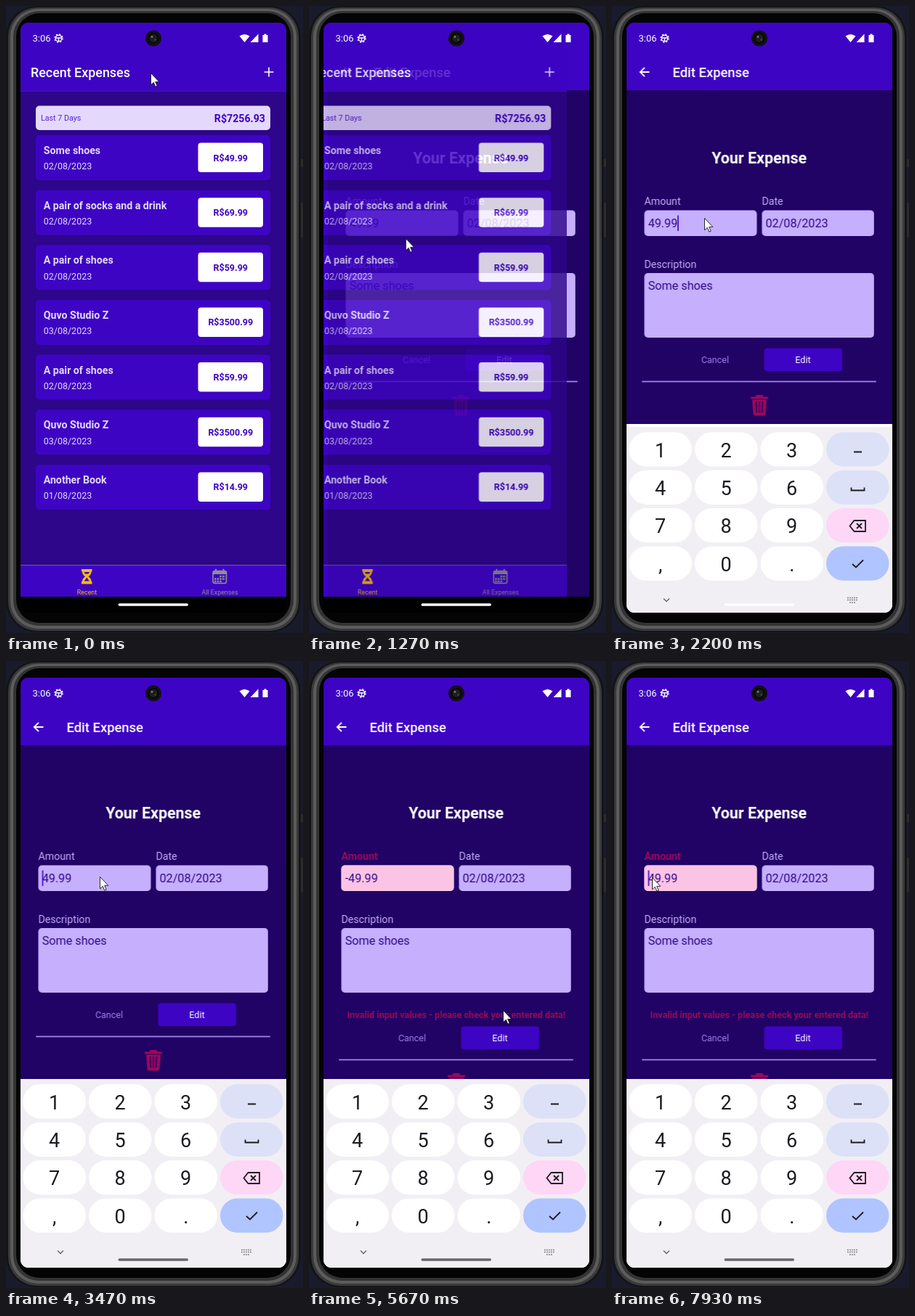
An HTML page that plays this animation: 409x864 px, repeating every 8000 ms.

```html
<!DOCTYPE html>
<html lang="en">
<head>
<meta charset="utf-8">
<title>Expense tracker demo</title>
<style>
html, body { margin: 0; width: 100%; height: 100%; overflow: hidden; background: #191b2d; }
svg { display: block; width: 100vw; height: 100vh; }
text { font: 12.5px Roboto, sans-serif; }
.bold { font-weight: 700; }
.mid { text-anchor: middle; }
.end { text-anchor: end; }
.head { font-size: 17.9px; font-weight: 500; fill: #fff; }
.label { font-size: 14.2px; fill: #c6affc; }
.value { font-size: 16.2px; fill: #2d0689; }
.item { font-size: 14.2px; font-weight: 700; fill: #e4d9fd; }
.tab { font-size: 8.9px; text-anchor: middle; }
.digit { font-size: 27px; text-anchor: middle; fill: #1d1b20; }
.line { fill: none; stroke: #1d1b20; stroke-width: 1.8; }

.list, .form, .cursor, .keyboard, .handle { animation: 8s linear infinite; }
.step, .lower, .caret { animation: 8s step-end infinite; }

.list { animation-name: leave; }
@keyframes leave {
  0%, 13% { transform: none; opacity: 1; animation-timing-function: ease-out; }
  14.96% { transform: translateX(-28px); opacity: 1; }
  15.875% { transform: translateX(-30.7px); opacity: .82; }
  17.5% { transform: translateX(-36px); opacity: .42; }
  19.125% { transform: translateX(-36.7px); opacity: .18; }
  20.5%, 100% { transform: translateX(-36.7px); opacity: 0; }
}
.form { animation-name: enter; }
@keyframes enter {
  0%, 13% { transform: translateX(36.7px); animation-timing-function: ease-out; }
  14.96% { transform: translateX(8.7px); }
  15.875% { transform: translateX(6px); }
  17.5% { transform: translateX(.7px); }
  19.125%, 100% { transform: none; }
}
.cursor { animation-name: point; }
@keyframes point {
  0%, .8% { transform: translate(199px, 92px); }
  5.5% { transform: translate(118px, 250px); }
  9.1%, 12% { transform: translate(125px, 222px); }
  15.875% { transform: translate(133px, 320px); }
  19.125%, 21.6% { transform: translate(96px, 335px); }
  24.5%, 32% { transform: translate(127px, 292px); }
  35%, 61.6% { transform: translate(129px, 297px); }
  67%, 74.1% { transform: translate(267px, 481px); }
  83.3%, 86.6% { transform: translate(52px, 298px); }
  88.4%, 95% { transform: translate(41px, 312px); }
  96.6%, 100% { transform: translate(55px, 298px); }
}
.white { animation-name: resize; }
@keyframes resize { 0% { opacity: 0; } 24.125%, 100% { opacity: 1; } }
.keyboard { animation-name: rise; }
@keyframes rise {
  0%, 24.125% { transform: translateY(262px); animation-timing-function: cubic-bezier(.1, .7, .3, 1); }
  27.5% { transform: translateY(4px); animation-timing-function: ease-out; }
  29.5%, 100% { transform: none; }
}
.handle { fill: #fff; animation-name: darken; }
@keyframes darken { 0%, 31.6% { fill: #fff; } 40%, 100% { fill: #68656c; } }
.plain { animation-name: plain; }
@keyframes plain { 0% { opacity: 1; } 54.125% { opacity: 0; } 99.125%, 100% { opacity: 1; } }
.minus { animation-name: minus; }
@keyframes minus { 0% { opacity: 0; } 54.125% { opacity: 1; } 99.125%, 100% { opacity: 0; } }
.valid { animation-name: valid; }
@keyframes valid { 0% { opacity: 1; } 68.75%, 100% { opacity: 0; } }
.error { animation-name: error; }
@keyframes error { 0% { opacity: 0; } 68.75%, 100% { opacity: 1; } }
.lower { animation-name: push; }
@keyframes push { 0% { transform: none; } 68.75%, 100% { transform: translateY(32px); } }
.caret { animation-name: blink; }
@keyframes blink {
  0% { opacity: 0; transform: translateX(91px); }
  24.125% { opacity: 1; transform: translateX(91px); }
  31.6% { opacity: 0; transform: translateX(91px); }
  33.7% { opacity: 1; transform: translateX(50.5px); }
  37.5% { opacity: 0; transform: translateX(50.5px); }
  43.3% { opacity: 1; transform: translateX(50.5px); }
  50% { opacity: 0; transform: translateX(50.5px); }
  54.125% { opacity: 1; transform: translateX(55px); }
  61.6% { opacity: 0; transform: translateX(55px); }
  82.5% { opacity: 1; transform: translateX(55px); }
  86.6% { opacity: 0; transform: translateX(55px); }
  92.5% { opacity: 1; transform: translateX(55px); }
  99.125%, 100% { opacity: 1; transform: translateX(50.5px); }
}
</style>
</head>
<body>
<svg viewBox="0 0 409 864" preserveAspectRatio="none">
  <defs>
    <clipPath id="screen"><rect x="20" y="23" width="366" height="813" rx="11"/></clipPath>
    <clipPath id="app"><rect x="20" y="23" width="366" height="791"/></clipPath>
    <clipPath id="dock"><rect x="20" y="576" width="366" height="260"/></clipPath>
  </defs>

  <!-- phone body -->
  <g fill="#2b2c30">
    <rect x="403" y="211" width="6" height="11"/>
    <rect x="403" y="271" width="6" height="48" rx="2"/>
  </g>
  <rect x="0" y="0" width="406" height="863" rx="42" fill="#141416"/>
  <rect x="3" y="2" width="400" height="859" rx="40" fill="#3a3a3b"/>
  <rect x="6" y="4" width="394" height="854" rx="38" fill="#5c5c5c"/>
  <rect x="10" y="7" width="386" height="847" rx="35" fill="#333"/>
  <rect x="14" y="10" width="378" height="840" rx="32" fill="#040404"/>

  <g clip-path="url(#screen)">
    <rect x="20" y="23" width="366" height="813" fill="#000"/>
    <g clip-path="url(#app)">
      <rect x="20" y="23" width="366" height="791" fill="#3e04c3"/>

      <g class="form">
        <rect x="20" y="23" width="366" height="791" fill="#200364"/>
        <rect x="20" y="23" width="366" height="93" fill="#3e04c3"/>
        <path d="M51.5 91H39M45 84.8L38.8 91L45 97.2" fill="none" stroke="#fff" stroke-width="1.8"/>
        <text class="head" x="83.5" y="98" style="font-size:18.4px">Edit Expense</text>
        <text class="bold mid" x="202.7" y="217" fill="#fff" style="font-size:21.4px">Your Expense</text>
        <text class="label step valid" x="44.5" y="274">Amount</text>
        <text class="label bold step error" x="44.5" y="274" style="fill:#9b095c">Amount</text>
        <text class="label" x="206.5" y="274">Date</text>
        <text class="label" x="44.5" y="360.5">Description</text>
        <g fill="#c6affc">
          <rect x="44.5" y="281.5" width="155" height="35.5" rx="5"/>
          <rect x="206.5" y="281.5" width="154.5" height="35.5" rx="5"/>
          <rect x="44.5" y="368" width="316.5" height="89" rx="5"/>
        </g>
        <rect class="step error" x="44.5" y="281.5" width="155" height="35.5" rx="5" fill="#fcc4e4"/>
        <text class="value step plain" x="49.7" y="305">49.99</text>
        <text class="value step minus" x="49.7" y="305">-49.99</text>
        <text class="value" x="211.5" y="305">02/08/2023</text>
        <text class="value" x="49.7" y="390.5">Some shoes</text>
        <rect class="caret" x="-.8" y="288.5" width="1.6" height="21.5" fill="#3e04c3"/>
        <text class="bold mid step error" x="203" y="492" fill="#9b095c" style="font-size:12.6px">Invalid input values - please check your entered data!</text>
        <g class="lower">
          <text class="mid" x="142" y="492" fill="#a281f0">Cancel</text>
          <rect x="209.5" y="471.5" width="107.5" height="31.5" rx="3.5" fill="#3e04c3"/>
          <text class="mid" x="263" y="492" fill="#fff">Edit</text>
          <rect x="41" y="516.6" width="323" height="1.8" fill="#a281f0"/>
          <path d="M191 538.5H198V536H208V538.5H215V541.5H191ZM193 542.5H213L211.5 562Q211.3 564.5 209 564.5H197Q194.700 564.5 194.500 562Z" fill="#9b095c"/>
          <path d="M198.7 545L199.2 560.5M203 545V560.5M207.3 545L206.8 560.5" stroke="#200364" stroke-width="1.6"/>
        </g>
      </g>

      <g class="list">
        <rect x="20" y="23" width="366" height="791" fill="#2d0689"/>
        <rect x="20" y="23" width="366" height="94" fill="#3e04c3"/>
        <rect x="20" y="117" width="366" height="1" fill="#40199a"/>
        <text class="head" x="34" y="98">Recent Expenses</text>
        <path d="M355.5 91H368.5M362 84.5V97.5" stroke="#fff" stroke-width="1.6"/>
        <rect x="41" y="137.5" width="323" height="33.5" rx="5" fill="#e4d9fd"/>
        <text x="48" y="158" fill="#5721d4" style="font-size:10.7px">Last 7 Days</text>
        <text class="bold end" x="357" y="159.5" fill="#3e04c3" style="font-size:14.2px">R$7256.93</text>
        <g id="cards"></g>
        <rect x="20" y="770" width="366" height="44" fill="#3e04c3"/>
        <rect x="20" y="770" width="366" height=".8" fill="#7c6f9f"/>
        <path d="M104 776H118.5V779.500H117.500Q117.500 783.500 113.500 786.300Q117.500 789 117.500 793H118.500V796.500H104V793H105Q105 789 109 786.300Q105 783.500 105 779.500H104Z" fill="#f7bc0c"/>
        <path d="M107.5 780H115L113.5 782.500H109ZM111.250 787.500L114.800 792.500H107.700Z" fill="#3e04c3"/>
        <g fill="none" stroke="#8e8e93">
          <rect x="285" y="778.500" width="18.500" height="17" rx="2.500" stroke-width="1.600"/>
          <path d="M285 781H303.5" stroke-width="4"/>
          <path d="M289 775.800V779M299.500 775.800V779" stroke-width="2"/>
          <path d="M294.300 786H302M287 789.500H302M287 793H298" stroke-width="2.300" stroke-dasharray="2.500 1.150"/>
        </g>
        <text class="tab" x="111.5" y="811" fill="#f7bc0c">Recent</text>
        <text class="tab" x="294.5" y="811" fill="#8e8e93">All Expenses</text>
      </g>
    </g>

    <!-- status bar -->
    <text x="36.5" y="49" fill="#fff" style="font-size:13px">3:06</text>
    <g fill="none" stroke="#fff">
      <circle cx="72.5" cy="44.5" r="4.3" stroke-width="1.4"/>
      <circle cx="72.5" cy="44.5" r="5.6" stroke-width="1.3" stroke-dasharray="2.2 2.2"/>
      <path d="M69 44H76M72.5 44V48" stroke-width="1.3"/>
    </g>
    <path d="M321.5 41.5Q328.5 36.5 335.5 41.5L328.5 50ZM347.5 38.5V50H336.5ZM353.5 40H355.5V38.5H358.5V40H360.5V50H353.5Z" fill="#fff"/>
    <circle cx="203" cy="44.5" r="11" fill="#111214"/>
    <circle cx="203" cy="44.5" r="6.5" fill="#1d1f1f" stroke="#08080a" stroke-width="2"/>
    <circle cx="201" cy="42.5" r="1.4" fill="#75796e"/>
    <circle cx="205.5" cy="46.5" r="1" fill="#565a52"/>

    <rect class="step white" x="20" y="576" width="366" height="260" fill="#fff"/>
    <g clip-path="url(#dock)">
      <g class="keyboard">
        <rect x="20" y="576" width="366" height="260" fill="#f2eff4"/>
        <g id="keys"></g>
        <path class="line" d="M333 610.5H344M329.5 659.5V663.5H347.5V659.5"/>
        <path class="line" d="M327.5 712.5L333.5 705H349V720H333.5ZM337 709L344 716M344 709L337 716"/>
        <path class="line" d="M331 765L336 769.5L346 759.5"/>
        <path class="line" d="M71 812.5L75 816.5L79 812.5" style="stroke:#66636a;stroke-width:1.4"/>
        <path class="line" d="M324 811.5H338M324 814.5H338M327 818H335" style="stroke:#77747b;stroke-width:1.5;stroke-dasharray:1.8 1.2"/>
      </g>
    </g>
    <rect class="handle" x="154.5" y="823.2" width="96.5" height="3.5" rx="1.75"/>
  </g>

  <path class="cursor" d="M.5 .5V16.8L4.3 13.3L6.8 19.2L9.2 18.2L6.7 12.4H11.8Z" fill="#fff" stroke="#16161c" stroke-width=".9"/>
</svg>
<script>
const expenses = [
  ["Some shoes", "02/08/2023", "49.99"],
  ["A pair of socks and a drink", "02/08/2023", "69.99"],
  ["A pair of shoes", "02/08/2023", "59.99"],
  ["Quvo Studio Z", "03/08/2023", "3500.99"],
  ["A pair of shoes", "02/08/2023", "59.99"],
  ["Quvo Studio Z", "03/08/2023", "3500.99"],
  ["Another Book", "01/08/2023", "14.99"]
];
const card = ([title, date, amount], i) => `
  <g transform="translate(0 ${178 + i * 75.65})">
    <rect x="41" width="323" height="62" rx="5" fill="#3e04c3"/>
    <text class="item" x="51.7" y="26">${title}</text>
    <text x="51.7" y="47.3" fill="#e4d9fd">${date}</text>
    <rect x="264.5" y="10.5" width="89.5" height="40.5" rx="4" fill="#fff"/>
    <text class="bold mid" x="309.3" y="35.5" fill="#3e04c3">R$${amount}</text>
  </g>`;
document.getElementById("cards").innerHTML = expenses.map(card).join("");

const sideColors = ["#dde1f7", "#dde1f7", "#fed6f6", "#b0c4ff"];
const key = (label, i) => {
  const col = i % 4, row = Math.floor(i / 4);
  const x = 23.5 + col * 90.5, y = 583.3 + row * 52.4;
  return `<rect x="${x}" y="${y}" width="86.5" height="47.2" rx="23.6"
    fill="${col === 3 ? sideColors[row] : "#fff"}"/>
    <text class="digit" x="${x + 43.2}" y="${y + 34.2}">${label}</text>`;
};
document.getElementById("keys").innerHTML = [..."123 456 789 ,0. "].map(key).join("");
</script>
</body>
</html>
```
